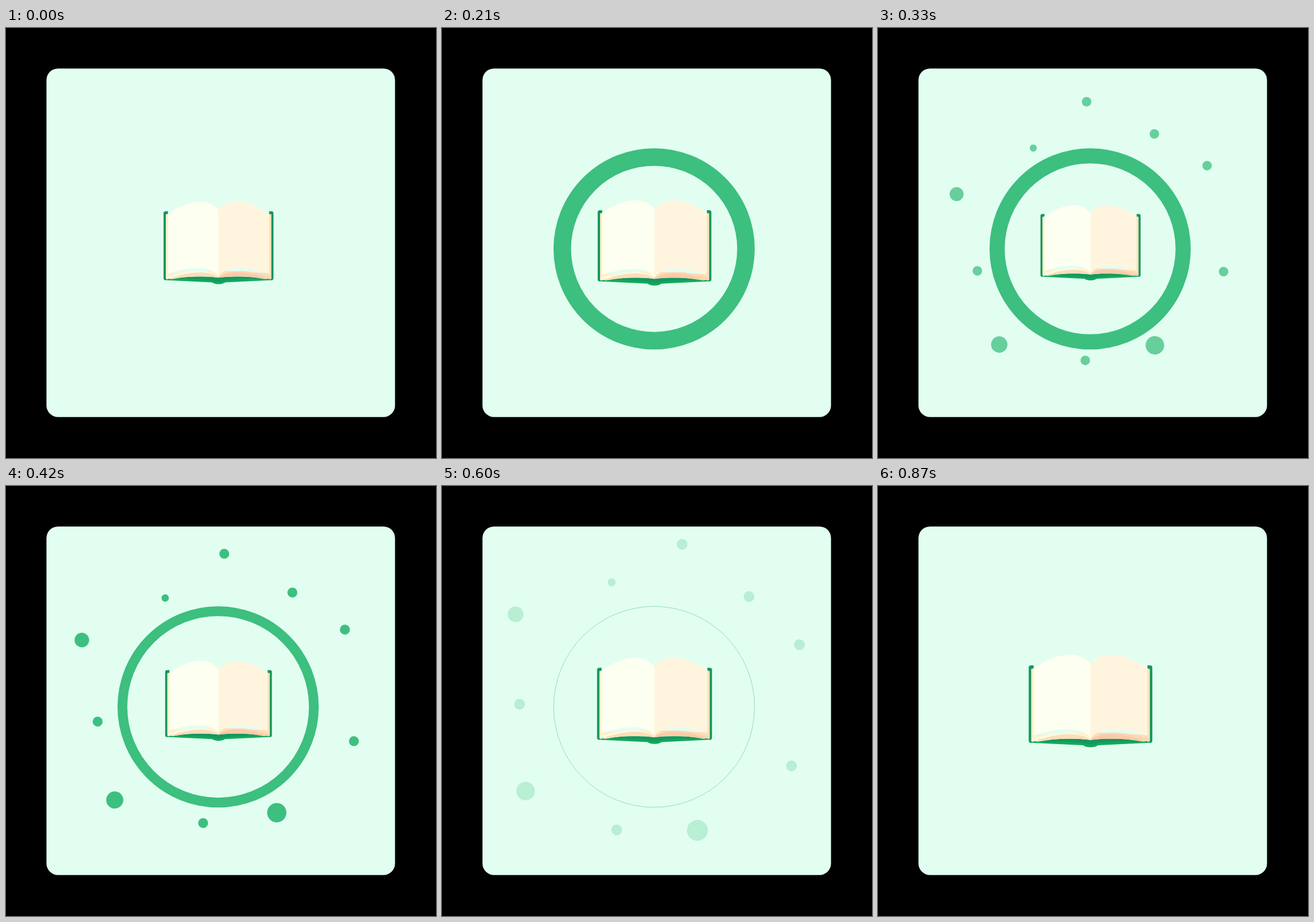
Animation of 748 by 748 pixels, one loop 1 s. Source, as an HTML page with a canvas:

```html
<!DOCTYPE html>
<html lang="en">
<head>
<meta charset="utf-8">
<title>Book</title>
<style>
html, body { margin: 0; width: 100%; height: 100%; overflow: hidden; background: #000; }
canvas { display: block; width: 748px; height: 748px; }
</style>
</head>
<body>
<canvas id="stage" width="748" height="748"></canvas>
<script>
const ctx = document.getElementById('stage').getContext('2d');
const GREEN = '#3dbf7f', MINT = '#e2fef1', COVER = '#17965f', SPINE = '#10aa5a';

const LOOP = 1000, STEP = 30, LAST = 29;

// x, y, radius of each spark at step 17
const sparks = [
  [398, 109, 9], [516, 188, 9], [606, 262, 9], [607.5, 465, 9], [458.5, 584, 17.5],
  [324, 593, 9], [167.3, 539.5, 15.5], [146.7, 395.5, 9], [129, 246, 13.2], [285.3, 181, 6.7]
];

// step, book scale
const beats = [[-1, 0.884], [5, 0.958], [11, 0.81], [17, 0.917], [29, 1]];

const clamp = v => Math.max(0, Math.min(1, v));
const ramp = (k, a, b) => clamp((k - a) / (b - a));
const ease = (k, a, b) => { const u = ramp(k, a, b); return u * u * (3 - 2 * u); };

function fill(path, color) {
  ctx.fillStyle = color;
  ctx.fill(typeof path === 'string' ? new Path2D(path) : path);
}

function disc(x, y, r) {
  const p = new Path2D();
  p.arc(x, y, r, 0, Math.PI * 2);
  return p;
}

function bookScale(k) {
  let i = 0;
  while (i < beats.length - 2 && k > beats[i + 1][0]) i++;
  const [a, from] = beats[i], [b, to] = beats[i + 1];
  return from + (to - from) * ease(k, a, b);
}

// Half a book to the left of the fold at x = 0; y is relative to the scaling centre.
function half(page, strip, back, mid, front) {
  fill('M-107.5 -57 Q-107.5 -61 -103.5 -61 H-99 V-55 H-103 V73.5 H-104 Q-107.5 73.5 -107.5 70 Z', COVER);
  fill('M-103 -54 Q-101 -56 -97 -56 V69 L-103 71 Z', strip);
  fill('M-102.5 63 L-98 60 L0 55 V68.5 Q-40 62 -93 72 L-95 70 L-102 72 Z', back);
  fill('M-102 67 C-70 57 -22 48 0 68 C-25 56 -65 62 -98 71 L-101 72 Z', mid);
  fill('M-96 71 C-70 60 -22 51 0 68.5 C-30 65 -62 66 -96 71.5 Z', front);
  fill('M-99 -56 C-62 -81 -22 -91 0.3 -63 V67 C-14 45 -50 46 -99 61 Z', page);
}

function drawBook(s) {
  ctx.save();
  ctx.translate(369.7, 373);
  ctx.scale(s, s);
  fill('M-106 71 H106 V73.5 L13 78 Q8 81.5 0 81.5 Q-8 81.5 -13 78 L-106 73.5 Z', SPINE);
  fill('M-98 71.5 C-62 65.5 -18 66 0 69 C18 66 62 65.5 98 71.5 C58 71 24 72 9 75 Q0 78 -9 75 C-24 72 -58 71 -98 71.5 Z', COVER);
  half('#fdfff1', '#fff0c5', '#fff0c8', '#fff8e2', '#fdddb9');
  ctx.scale(-1, 1);
  half('#fff5df', '#ffe2b5', '#ffe0b4', '#ffd5b6', '#fccaa6');
  ctx.restore();
}

function drawRing(k) {
  const size = ease(k, 2, 7), width = 30.5 * (1 - ease(k, 8, 21));
  if (size <= 0 || width <= 0) return;
  ctx.strokeStyle = GREEN;
  ctx.lineWidth = width * size;
  ctx.stroke(disc(369, 384.2, (175 - width / 2) * size));
}

function drawSparks(k) {
  const alpha = Math.min(ramp(k, 8, 12), 1 - ramp(k, 17, 21));
  if (alpha <= 0) return;
  const s = 1 + (k - 17) * 0.0135;
  ctx.save();
  ctx.globalAlpha = alpha;
  ctx.translate(375, 355);
  ctx.rotate((k - 17) * 1.4 * Math.PI / 180);
  ctx.scale(s, s);
  for (const [x, y, r] of sparks) fill(disc(x - 375, y - 355, r), GREEN);
  ctx.restore();
}

function draw(k) {
  ctx.fillStyle = '#000';
  ctx.fillRect(0, 0, 748, 748);
  const card = new Path2D();
  card.roundRect(70.4, 70.4, 606.3, 606.3, 20);
  fill(card, MINT);
  drawRing(k);
  drawSparks(k);
  drawBook(bookScale(k));
}

const start = performance.now();
function tick() {
  const t = (performance.now() - start) % LOOP;
  draw(Math.min(LAST, Math.floor(t / STEP)));
  requestAnimationFrame(tick);
}
tick();
</script>
</body>
</html>
```
